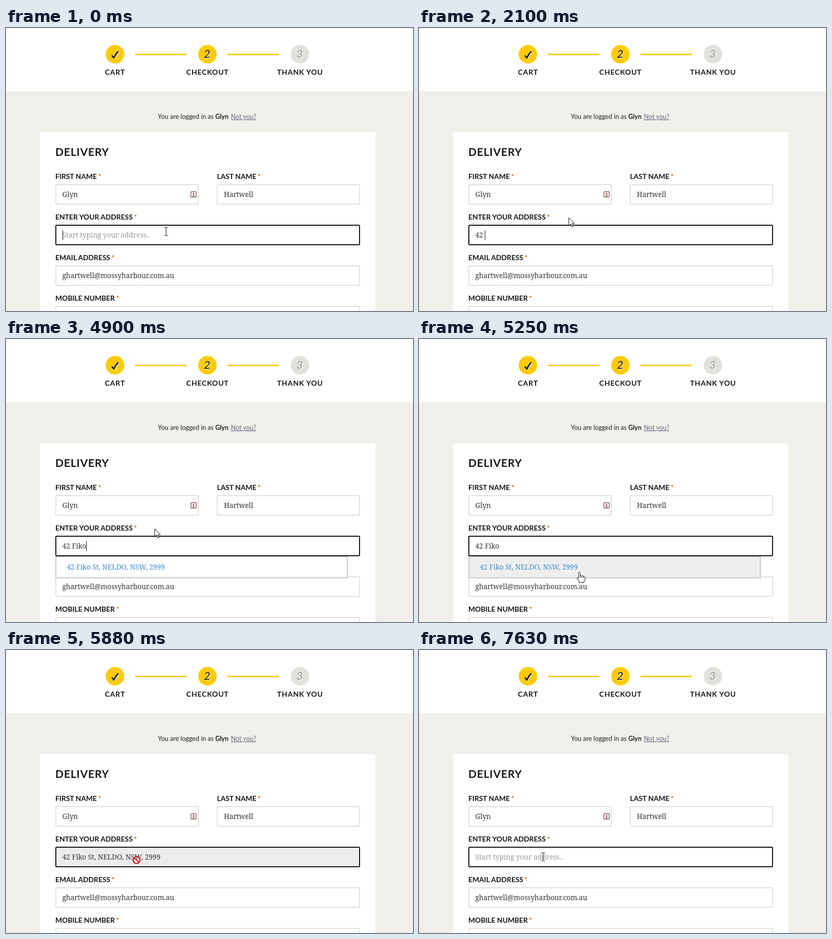
Recreate the animation shown at these times as an HTML page. Size 792 by 551 pixels, loop 8 s.

```html
<!DOCTYPE html>
<html lang="en">
<head>
<meta charset="utf-8">
<title>Checkout address lookup</title>
<style>
  html, body { margin: 0; width: 100%; height: 100%; overflow: hidden; background: #fff; }
  svg { display: block; }
  text { white-space: pre; }
  .step, .label, .title { font-family: Lato, sans-serif; font-weight: 700; fill: #15151b; }
  .step { font-size: 14px; letter-spacing: .8px; text-anchor: middle; }
  .label { font-size: 13.8px; }
  .title { font-size: 21px; letter-spacing: .8px; }
  .note { font: 12.5px Lato, sans-serif; fill: #222; }
  .num { font: italic 22px Lato, sans-serif; text-anchor: middle; }
  .value, .item { font: 13.6px "Noto Serif", serif; fill: #333; }
  .item { fill: #428bca; }
  .star { fill: #d0691c; }
</style>
</head>
<body>
<svg id="stage" xmlns="http://www.w3.org/2000/svg" width="792" height="551" viewBox="0 0 792 551"></svg>
<script>
const LOOP = 8000;
const stage = document.getElementById('stage');

function add(tag, attrs = {}, text = '', parent = stage) {
  const el = document.createElementNS('http://www.w3.org/2000/svg', tag);
  for (const key in attrs) el.setAttribute(key, attrs[key]);
  if (text) el.textContent = text;
  parent.appendChild(el);
  return el;
}
const rect = (x, y, width, height, fill) => add('rect', { x, y, width, height, fill });
const write = (cls, x, y, text, parent) => add('text', { class: cls, x, y }, text, parent);
const field = (x, y, w, stroke = '#e3e1dc', h = 40) => add('rect', {
  x: x + 1, y: y + 1, width: w - 2, height: h - 2, rx: 1.5, fill: '#fff', stroke, 'stroke-width': 2
});
const show = (el, on) => el.setAttribute('display', on ? 'inline' : 'none');

function label(x, y, text) {
  const el = write('label', x, y, text);
  add('tspan', { class: 'star', dx: 2.5 }, '*', el);
}

// Progress header
const YELLOW = '#ffcb08';
rect(0, 123, 792, 428, '#f0efea');
rect(251, 50, 100, 3, YELLOW);
rect(431, 50, 100, 3, YELLOW);
['CART', 'CHECKOUT', 'THANK YOU'].forEach((name, i) => {
  const cx = 212 + 180 * i;
  add('circle', { cx, cy: 51, r: 18, fill: i < 2 ? YELLOW : '#e3e1db' });
  write('step', cx + .2, 91, name);
});
for (const [d, stroke] of [[1, '#fff'], [0, '#15151b']]) {
  add('path', {
    d: 'M206 53.5L210 58.5Q213 51 218.5 45.5', transform: `translate(${d} ${d})`,
    fill: 'none', stroke, 'stroke-width': 2.6, 'stroke-linejoin': 'round'
  });
}
for (const [x, text, fill] of [[391.5, '2', '#15151b'], [571.5, '3', '#999']]) {
  write('num', x + 1, 59, text).style.fill = '#fff';
  write('num', x, 58, text).style.fill = fill;
}

// Account note
const note = write('note', 295.5, 177, 'You are logged in as ');
add('tspan', { 'font-weight': 700 }, 'Glyn', note);
add('tspan', { x: 437.5, fill: '#6d6a85', 'text-decoration': 'underline' }, 'Not you?', note);

// Delivery form
rect(66, 203, 653, 348, '#fff');
write('title', 96, 249, 'DELIVERY');
label(96, 294, 'FIRST NAME');
label(410.5, 294, 'LAST NAME');
label(96, 373, 'ENTER YOUR ADDRESS');
label(96, 452, 'EMAIL ADDRESS');
label(96, 531, 'MOBILE NUMBER');
field(96, 304, 279);
field(410, 304, 279);
const addressBox = field(96, 383, 593, '#15151b');
field(96, 462, 593);
field(96, 541, 593);
write('value', 109.5, 329, 'Glyn');
write('value', 424, 329, 'Hartwell');
write('value', 109.5, 487, 'ghartwell@mossyharbour.com.au');

// Contact card icon
add('rect', { x: 359.75, y: 318.75, width: 10.5, height: 10.5, rx: 1.5, fill: '#fff', stroke: '#86636b', 'stroke-width': 1.5 });
add('circle', { cx: 365, cy: 322.5, r: 1.5, fill: '#a3574a' });
rect(363, 324.5, 4, 1.5, '#a3574a');
rect(362.5, 327, 5, 1, '#86636b');

const value = write('value', 109.5, 408, '');
const caret = rect(110, 394, 1, 19, '#111');

// Suggestions
const menu = add('rect', { x: 97, y: 424, width: 567, height: 41, stroke: '#c9c9c9', 'stroke-width': 2 });
const items = [0, 1, 2, 3].map(i => write('item', 118, 449 + 39 * i, ''));

// Pointers, each drawn around its hot spot
const pointers = {
  arrow: add('path', {
    d: 'M.5.5V16.2L4.2 12.7L6.7 18.3L9 17.3L6.6 11.8H11.4Z', fill: '#fff', stroke: '#111'
  }),
  beam: add('path', {
    d: 'M-3 -7.5H-1L.5 -6.5L2 -7.5H4M.5 -6.5V7.5M-3 8.5H-1L.5 7.5L2 8.5H4', fill: 'none', stroke: '#111'
  }),
  hand: add('path', {
    d: 'M-1.5 2Q0 -.5 1.5 2V8Q3 6.5 4.5 8.3Q6.3 7.3 7.7 9Q10.8 8.5 11 11V16L9 19V21.5H0V19.5L-4.5 13.5Q-4.5 10.5 -1.5 13ZM1.5 8V12M4.5 8.3V12M7.7 9V12',
    fill: '#fff', stroke: '#111', 'stroke-linejoin': 'round'
  }),
  stop: add('g')
};
add('circle', { r: 7, fill: '#fff', 'fill-opacity': .4 }, '', pointers.stop);
add('path', {
  d: 'M-6.7 0A6.7 6.7 0 1 1 6.7 0A6.7 6.7 0 1 1 -6.7 0M-4.7 -4.7L4.7 4.7',
  fill: 'none', stroke: '#c9151b', 'stroke-width': 2.2
}, '', pointers.stop);

const ADDRESS = '42 Fiko St, NELDO, NSW, 2999';
const typing = [[0, 0], [1470, 1], [1750, 2], [2100, 3], [2450, 4], [2660, 5], [3010, 6],
  [4340, 7], [5530, ADDRESS.length], [7140, 0]];
const blink = [[0, 1], [210, 0], [700, 1], [1190, 0], [1470, 1], [3920, 0], [4340, 1],
  [5180, 0], [7140, 1], [7630, 0]];
const lists = [
  [0, []],
  [3150, ['42 Fidano St, ORVELLE, QLD, 4999', '42 Fiko St, NELDO, NSW, 2999',
    '42 Filora Rd, TANBERRY, VIC, 3999', '42 Fisk Ave, WOLMARA, SA, 5999']],
  [3430, ['42 Fikora St, TOLVENA, WA, 6999', ADDRESS]],
  [4760, [ADDRESS]],
  [5530, []]
];
const moves = [
  [0, 'beam', 311, 396], [70, 'beam', 314, 394], [140, 'beam', 320, 388], [210, 'arrow', 318, 374],
  [280, 'arrow', 314, 361], [350, 'arrow', 306, 356], [420, 'arrow', 299, 360],
  [490, 'arrow', 293, 366], [560, 'arrow', 291, 369], [4760, 'arrow', 290, 369],
  [4900, 'arrow', 289, 369], [4970, 'arrow', 291, 376], [5040, 'beam', 297, 398],
  [5110, 'hand', 304, 428], [5180, 'hand', 310, 446], [5250, 'hand', 312, 453],
  [5530, 'arrow', 313, 453], [5670, 'arrow', 299, 437], [5740, 'stop', 275, 413],
  [5810, 'stop', 260, 410], [5880, 'stop', 254, 409], [7140, 'beam', 242, 402],
  [7420, 'beam', 242, 401], [7490, 'beam', 241, 402]
];

const at = (track, t) => track.findLast(step => step[0] <= t);

function draw(t) {
  const typed = ADDRESS.slice(0, at(typing, t)[1]).replace(/ /g, '\u00a0');
  value.textContent = typed || 'Start typing your address..';
  value.style.fill = typed ? '#333' : '#999';
  addressBox.setAttribute('fill', t >= 5670 && t < 7140 ? '#ececec' : '#fff');

  const width = typed ? value.getComputedTextLength() : 0;
  caret.setAttribute('x', typed ? Math.floor(109.4 + width) : 110);
  show(caret, at(blink, t)[1]);

  const list = at(lists, t)[1];
  const [, kind, x, y] = at(moves, t);
  show(menu, list.length);
  menu.setAttribute('height', 39 * list.length + 2);
  menu.setAttribute('fill', kind === 'hand' ? '#eee' : '#fff');
  items.forEach((el, i) => { el.textContent = list[i] || ''; });

  for (const name in pointers) show(pointers[name], name === kind);
  pointers[kind].setAttribute('transform', `translate(${x} ${y})`);
}

const start = performance.now();
function tick() {
  draw((performance.now() - start) % LOOP);
  requestAnimationFrame(tick);
}
tick();
</script>
</body>
</html>
```
